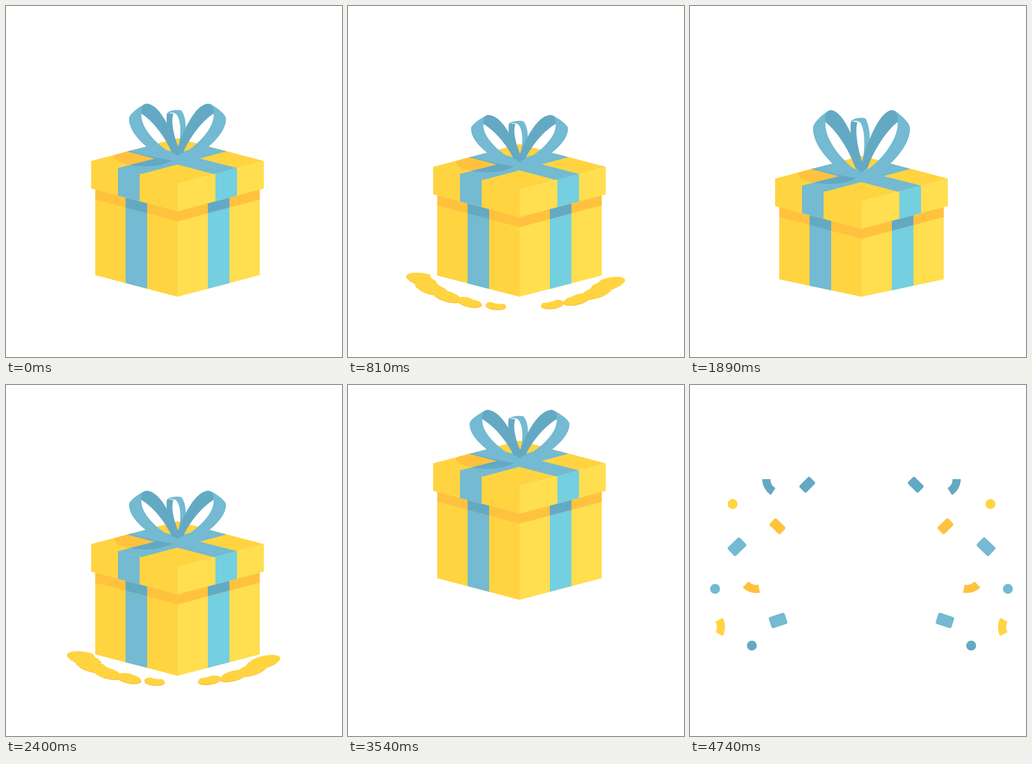
Write an HTML page with a canvas that moves like this. It is 576 px wide and 600 px high and loops after 4.77 s.

```html
<!DOCTYPE html>
<html lang="en">
<head>
<meta charset="utf-8">
<title>Gift box</title>
<style>
html, body { margin: 0; width: 100%; height: 100%; overflow: hidden; background: #fff; }
canvas { display: block; }
</style>
</head>
<body>
<canvas id="stage" width="576" height="600"></canvas>
<script>
const ctx = document.getElementById('stage').getContext('2d');
const LOOP = 4770, CX = 294, SLOPE = 39 / 148;
const STARTS = [0, 1620, 2890];
const CROUCH = 60, RELEASE = 320, TAKEOFF = 402, LAND = 735, SETTLE = 560;
const BURST = 3600, SPREAD = 3870, GONE = 3680;
const YELLOW = '#ffd440', LIGHT = '#ffde50', ORANGE = '#ffc23f';
const BLUE = '#73bad2', DARK = '#64a9c3', CYAN = '#74cfe0';

const clamp = v => Math.min(1, Math.max(0, v));
const mix = (a, b, k) => a + (b - a) * k;
const progress = (t, from, to) => clamp((t - from) / (to - from));
const smooth = k => k * k * (3 - 2 * k);
const easeOut = (k, power) => 1 - (1 - k) ** power;

// Crouch, fly along a parabola, then settle like a damped spring
function poseAt(phase) {
  if (phase < TAKEOFF) {
    const crouch = smooth(progress(phase, CROUCH, 260));
    const release = progress(phase, RELEASE, TAKEOFF);
    return {
      lid: mix(30 * crouch, -5, release), base: 0,
      width: 1 + .12 * release, height: mix(1 + .2 * crouch, .72, release)
    };
  }
  if (phase < LAND) {
    const u = progress(phase, TAKEOFF, LAND), base = -172 * 4 * u * (1 - u);
    return { lid: base - 5 * (1 - u), base, width: 1.12 - .12 * u, height: .72 + .28 * u };
  }
  const s = Math.min(phase - LAND, SETTLE);
  const lid = 16 * Math.sin(2 * Math.PI * s / SETTLE) * Math.exp(-s / 400);
  return { lid, base: 0, width: 1, height: 1 - lid * .01 };
}

function fill(color, path) {
  ctx.fillStyle = color;
  ctx.fill(path);
}

function fillInside(clip, color, path) {
  ctx.save();
  ctx.clip(clip);
  fill(color, path);
  ctx.restore();
}

// Panel on a side of the box; top and bottom are heights at the front edge
function panel(color, x0, x1, top, bottom, slope = SLOPE) {
  const d0 = Math.abs(x0 - CX), d1 = Math.abs(x1 - CX);
  ctx.fillStyle = color;
  ctx.beginPath();
  ctx.moveTo(x0, top - d0 * SLOPE);
  ctx.lineTo(x1, top - d1 * SLOPE);
  ctx.lineTo(x1, bottom - d1 * slope);
  ctx.lineTo(x0, bottom - d0 * slope);
  ctx.fill();
}

const RIBBON = new Path2D('M192 277L342 239L378 248.5L229 288ZM396 277L359 288L208 248.5L246 239Z');
const LID_TOP = new Path2D('M146 265L294 226L442 265L294 304Z');
const BOW_SHADE = new Path2D('M185 257C190 247 204 246 214 249C238 256 256 259 285 264C268 273 250 275 232 274C208 272 187 268 185 257Z');
const LOOP_BACK = new Path2D('M232 185C229 173 235 166 243 167C264 170 285 212 298 256L284 250C272 222 250 195 232 184Z');
const LOOP_FRONT = new Path2D('M239 167C228 172 213 184 211 191C209 215 238 243 274 263L298 260C264 244 231 211 232 185C231 176 233 170 239 167Z');
const MID_BACK = new Path2D('M276 183C273 200 279 228 291 252L299 250C288 225 282 198 287 184Z');
const MID_FRONT = new Path2D('M276 184C277 179 294 176 301 179C312 195 309 225 301 250L293 250C301 225 301 196 292 185C287 181 282 182 276 184Z');

function drawBow({ lid, width, height }) {
  ctx.save();
  ctx.translate(CX, 262 + lid);
  ctx.scale(width, height);
  ctx.translate(-CX, -262);
  fill(DARK, MID_BACK);
  fill(BLUE, MID_FRONT);
  for (const layer of [[DARK, LOOP_BACK], [BLUE, LOOP_FRONT]]) {
    fill(...layer);
    ctx.save();
    ctx.translate(2 * CX, 0);
    ctx.scale(-1, 1);
    fill(...layer);
    ctx.restore();
  }
  ctx.restore();
}

function drawBox(pose) {
  const { lid, base } = pose;
  const flat = lid > 0 ? lid * lid * .008 : 0, slope = (37 - flat) / 141;
  const sides = [[153, CX, YELLOW, 205, 242, BLUE], [CX, 435, LIGHT, 346, 383, CYAN]];
  for (const [x0, x1, color, r0, r1, ribbon] of sides) {
    panel(color, x0, x1, 345 + lid, 497 + base, slope);
    panel(ribbon, r0, r1, 345 + lid, 497 + base, slope);
    panel(ORANGE, x0, x1, 345 + lid, 368 + lid);
    panel(DARK, r0, r1, 345 + lid, 368 + lid);
  }
  ctx.save();
  ctx.translate(0, lid);
  fill(YELLOW, LID_TOP);
  fillInside(LID_TOP, ORANGE, BOW_SHADE);
  fill(BLUE, RIBBON);
  fillInside(RIBBON, DARK, BOW_SHADE);
  panel(YELLOW, 146, CX, 303.5, 351);
  panel(LIGHT, CX, 442, 304, 351);
  panel(BLUE, 192, 229, 303.5, 351);
  panel(CYAN, 359, 396, 304, 351);
  ctx.restore();
  drawBow(pose);
}

// Thin streaks left under the corners at take-off
function drawStreaks(phase) {
  if (phase < RELEASE - 10 || phase > 490) return;
  const k = (phase - RELEASE) / 100;
  const length = 3 + 29 * clamp(k) - 32 * progress(phase, 420, 490);
  ctx.strokeStyle = '#f8cd48';
  ctx.lineWidth = 1.4;
  for (const side of [-1, 0, 1]) {
    const x = CX + side * 140, y = 509 - 28 * Math.abs(side) - 15 * k, bend = side * length / 14;
    ctx.beginPath();
    ctx.moveTo(x - bend, y - length * (side ? 1 : .75));
    ctx.quadraticCurveTo(x - bend, y - length / 3, x + bend, y);
    ctx.stroke();
  }
}

// A ring of dust puffs in front of the box; white bites thin them to crescents
function drawDust(age, life) {
  const q = age / life;
  if (q < 0 || q > 1) return;
  const out = easeOut(q, 2.5), bite = 1.8 * (1 - q) ** 1.3;
  const puffs = Array.from({ length: 9 }, (_, i) => {
    const angle = (173 - 17.5 * (i + (i > 4))) * Math.PI / 180;
    const c = Math.cos(angle), s = Math.sin(angle);
    return {
      x: 290 + (150 + 38 * out) * c, y: 460 + (37 + 47 * out) * s,
      rx: 14 + 15 * Math.abs(c), ry: 5 + 5 * Math.abs(c), c, s,
      tilt: .15 * (Math.sin(i * 7) - c)
    };
  });
  const ellipses = (color, shift) => {
    ctx.fillStyle = color;
    for (const p of puffs) {
      ctx.beginPath();
      ctx.ellipse(p.x - p.c * p.rx * shift, p.y - p.s * p.ry * shift, p.rx, p.ry, p.tilt, 0, 7);
      ctx.fill();
    }
  };
  ctx.save();
  ctx.translate(0, 3 * (1 - q));
  ellipses(ORANGE, .1);
  ctx.restore();
  ellipses(YELLOW, 0);
  ellipses('#fff', bite);
}

const disc = () => { ctx.arc(0, 0, 8.5, 0, 7); ctx.fill(); };
const slip = (w, h) => () => { ctx.roundRect(-w / 2, -h / 2, w, h, 3); ctx.fill(); };
const small = slip(25, 16.5), large = slip(28.5, 20);
const curl = () => { ctx.lineWidth = 14; ctx.arc(-26, 0, 26, -.49, .49); ctx.stroke(); };

// Confetti at rest: shape, colour, distance from the middle, height, angle
const CONFETTI = [
  [curl, DARK, 160, 173, 151], [small, DARK, 93, 170.5, -45],
  [disc, YELLOW, 221, 203.5, 0], [small, ORANGE, 144, 241.5, 44],
  [large, BLUE, 213.5, 276.5, -44], [disc, BLUE, 251, 348.5, 0],
  [curl, ORANGE, 188, 347.5, 107], [curl, YELLOW, 241, 413.5, -1],
  [large, BLUE, 143, 402.5, -18], [disc, DARK, 188, 445.5, 0]
];

// Pieces burst out of the middle, then drift outwards, sink and turn;
// the right side is a little further along
function drawConfetti(t) {
  if (t < BURST) return;
  const burst = easeOut(progress(t, BURST, SPREAD), 3);
  const left = (1 - progress(t, SPREAD, LOOP)) ** 2;
  for (const [shape, color, far, height, angle] of CONFETTI) {
    for (const side of [-1, 1]) {
      const rise = (18 + .12 * (height - 170)) * left * (side > 0 ? .86 : 1);
      const x = far * (1 - (side > 0 ? .1 : .115) * left);
      ctx.save();
      ctx.translate(CX, 0);
      ctx.scale(side, 1);
      ctx.translate(x * burst, mix(300, height - rise, burst));
      ctx.rotate(Math.PI - (angle + 19 * left) * Math.PI / 180);
      ctx.scale(burst, burst);
      ctx.fillStyle = ctx.strokeStyle = color;
      ctx.beginPath();
      shape();
      ctx.restore();
    }
  }
}

function draw(t) {
  ctx.fillStyle = '#fff';
  ctx.fillRect(0, 0, 576, 600);
  const turn = STARTS.findLastIndex(start => start <= t);
  const phase = t - STARTS[turn];
  drawDust(phase - LAND, turn === 2 ? 270 : 490);
  drawConfetti(t);
  if (t >= GONE) return;
  drawStreaks(phase);
  drawBox(poseAt(phase));
}

const begin = performance.now();
function tick() {
  draw(Math.max(0, performance.now() - begin) % LOOP);
  requestAnimationFrame(tick);
}
tick();
</script>
</body>
</html>
```
